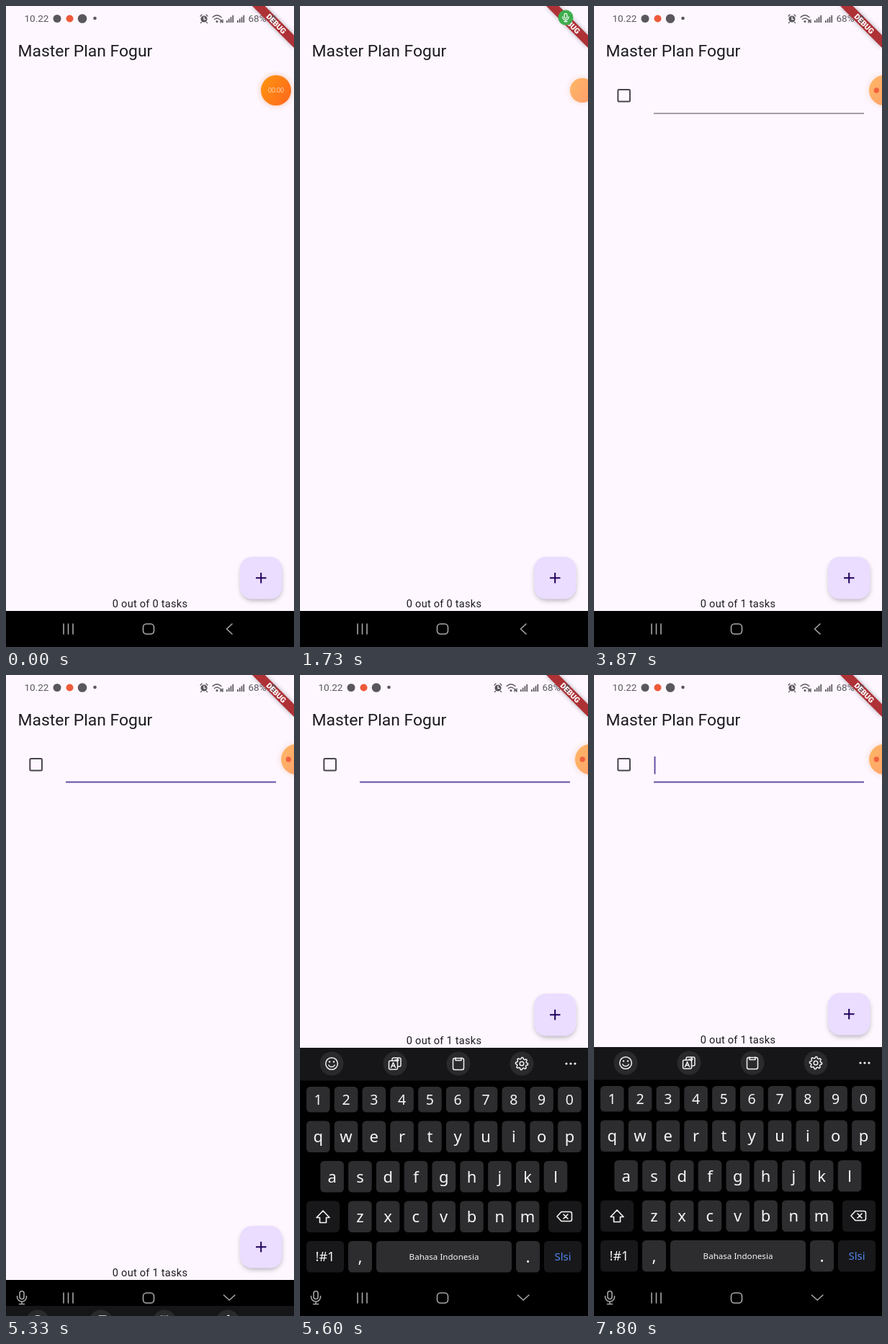
An HTML page for the animation above (8000 ms loop, 400 px wide and 889 px high).

```html
<!DOCTYPE html>
<html lang="en">
<head>
<meta charset="utf-8">
<title>Task list</title>
<style>
  html, body { margin: 0; width: 100%; height: 100%; overflow: hidden; background: #fef7ff; }
  svg { display: block; width: 100vw; height: 100vh; }
  text { font-family: Roboto, sans-serif; }
  .mid { text-anchor: middle; }
  .line { fill: none; stroke-linecap: round; stroke-linejoin: round; }
  .key { fill: #2d2d30; }
  .key.dark { fill: #18181a; }
  .cap { font-family: "Noto Sans", sans-serif; fill: #f6f6f6; text-anchor: middle; }
  #tools .line { stroke: #f2f2f2; stroke-width: 1.5; }
  #nav { stroke: #a6a6a6; stroke-width: 1.6; }
  #status { fill: #5a575c; }
  #status .line { stroke: #5a575c; stroke-width: 1.3; }
</style>
</head>
<body>
<svg viewBox="0 0 400 889" preserveAspectRatio="none">
  <defs>
    <linearGradient id="orange" x1="0" y1="0.2" x2="1" y2="0.8">
      <stop offset="0" stop-color="#ff9210"/><stop offset="1" stop-color="#ff6a1c"/>
    </linearGradient>
    <filter id="blur" x="-50%" y="-50%" width="200%" height="200%"><feGaussianBlur stdDeviation="3"/></filter>
    <g id="mic">
      <rect x="-3" y="-9" width="6" height="11" rx="3" class="line"/>
      <path d="M-6.5-2v1a6.5 6.5 0 0 0 13 0v-1M0 5.5V9M-3.5 9h7" class="line"/>
    </g>
  </defs>
  <rect width="400" height="889" fill="#fef7ff"/>

  <text x="16.600" y="70" font-size="22.880" fill="#1d1b20">Master Plan Fogur</text>

  <g id="task">
    <rect x="33.300" y="116" width="16.600" height="16.600" rx="1.500" fill="none" stroke="#49454f" stroke-width="2"/>
    <rect id="underline" x="83" width="292"/>
    <rect id="cursor" x="83.500" y="113" width="2" height="24.500" fill="#6750a4"/>
  </g>

  <g id="bottom">
    <rect x="326" y="768" width="57" height="57" rx="17" fill="#77727c" opacity=".5" filter="url(#blur)"/>
    <rect x="325" y="764" width="58.500" height="58.500" rx="16.600" fill="#eaddff"/>
    <path d="M347 793.300h14.500M354.200 786v14.500" stroke="#21005d" stroke-width="2"/>
    <text id="count" class="mid" x="200" y="834" font-size="14.560" letter-spacing=".26" fill="#1d1b20"></text>
  </g>

  <rect y="839" width="400" height="50" fill="#000"/>

  <g id="keyboard">
    <rect width="400" height="400" fill="#000"/>
    <rect width="400" height="45.500" fill="#161618"/>
    <g id="tools">
      <g id="discs" fill="#2a2a2d"></g>
      <g transform="translate(44 22)">
        <circle r="8.300" class="line"/><path d="M-4.200 2a4.700 4.700 0 0 0 8.400 0" class="line"/>
        <circle cx="-3" cy="-2.600" r="1.200" fill="#f2f2f2"/><circle cx="3" cy="-2.600" r="1.200" fill="#f2f2f2"/>
      </g>
      <g transform="translate(132 22)">
        <path d="M-4-4v-2q0-2 2-2h8q2 0 2 2v8q0 2-2 2h-2M0-5h5M3-7l2 2-2 2" class="line"/>
        <rect x="-8.500" y="-4" width="12" height="12" rx="2" class="line"/>
        <path d="M-5.500 5.500l3-7 3 7M-4.600 3.200h4.200" class="line"/>
      </g>
      <g transform="translate(220 22)">
        <rect x="-7.500" y="-7.500" width="15" height="16" rx="2.500" class="line"/>
        <path d="M-4-8v3.500h8V-8" class="line"/>
      </g>
      <g transform="translate(308 22)"><path id="gear" class="line"/><circle r="2.800" class="line"/></g>
      <g fill="#f2f2f2"><circle cx="370" cy="22" r="1.600"/><circle cx="376" cy="22" r="1.600"/><circle cx="382" cy="22" r="1.600"/></g>
    </g>
    <g id="keys"></g>
    <g stroke="#f6f6f6" stroke-width="1.600">
      <path d="M32 226l9 9.500h-4.500v7h-9v-7h-4.500z" class="line"/>
      <path d="M357 234l6-6.500h12q2.500 0 2.500 2.500v8q0 2.500-2.500 2.500h-12zM366 231l6 6M372 231l-6 6" class="line"/>
    </g>
  </g>

  <g id="nav">
    <path d="M80 857v14M86.500 857v14M93 857v14" class="line"/>
    <rect x="190.500" y="857" width="15" height="14" rx="4.500" class="line"/>
    <path id="back" d="M314 857l-7.500 7 7.500 7" class="line"/>
    <g id="typing">
      <path d="M302.500 860l7.700 7 7.700-7" class="line"/>
      <use href="#mic" x="22" y="863.500"/>
    </g>
  </g>

  <g id="status">
    <text x="25.500" y="22" font-size="13.500">10.22</text>
    <circle cx="71" cy="17.500" r="5.500"/>
    <circle cx="88.500" cy="17.500" r="5" fill="#ee5a3a"/>
    <circle cx="106" cy="17.500" r="6.300"/>
    <circle cx="123.500" cy="17" r="2.300"/>
    <circle cx="275" cy="18" r="4.600"/>
    <path d="M270 14l2-2M280 14l-2-2M271.500 22.500l-1 1M278.500 22.500l1 1" class="line"/>
    <path d="M275 15.500v3h2" class="line" style="stroke:#fef7ff"/>
    <path d="M287 15.500q6-5.500 12 0M289.500 18.500q3.500-3 7 0" class="line"/>
    <circle cx="293" cy="21.500" r="1.500"/><path d="M298 23v-4l1.500 1.500M301 19v4l-1.500-1.500" class="line"/>
    <g id="bars"></g>
    <text x="336.500" y="22" font-size="13.500">68%</text>
  </g>

  <path d="M342 0h17.600L400 40.400V58z" fill="#5c555e" opacity=".5" filter="url(#blur)"/>
  <path d="M342 0h17.600L400 40.400V58z" fill="#ae3136"/>
  <rect id="battery" x="366.500" y="13" width="8" height="10.500" rx="2" fill="#5a575c"/>
  <text class="mid" transform="translate(375.300 24.700) rotate(45)" y="3.700" font-size="10.600" font-weight="900" fill="#fff">DEBUG</text>

  <g id="badge">
    <circle r="10.500" fill="#3fae4e"/>
    <use href="#mic" transform="scale(.62)" stroke="#fff" stroke-width="2"/>
  </g>

  <g id="recorder">
    <circle id="glow" cy="117" fill="#f3c9b4" opacity=".7" filter="url(#blur)"/>
    <circle id="ball" cy="117" fill="url(#orange)"/>
    <text id="clock" class="mid" y="120" font-size="9" font-weight="300" fill="#fff"></text>
  </g>
  <circle id="dot" cx="392.300" cy="117" r="3.700" fill="#f0623f"/>
</svg>

<script>
const LOOP = 8000;
const $ = id => document.getElementById(id);
const set = (id, attrs) => { for (const k in attrs) $(id).setAttribute(k, attrs[k]); };
const show = (id, on) => { $(id).style.display = on ? "" : "none"; };
const mix = (a, b, p) => a + (b - a) * p;

// Value held since the latest entry of a [time, value] table.
const held = (table, t) => table.reduce((v, [at, next]) => t >= at ? next : v, table[0][1]);
// Progress 0..1 in n equal jumps, the first at a and the last at b.
const steps = (t, a, b, n) =>
  t < a ? 0 : Math.min(1, (Math.floor((t - a) / (b - a) * (n - 1) + 1e-6) + 1) / n);
const ease = p => 1 - (1 - p) ** 2;

const KEYBOARD_TOP = [[0, 889], [5330, 875], [5400, 690], [5470, 568], [5530, 531], [5600, 517], [5670, 516]];
const CURSOR = [[0, 0], [4870, 1], [5330, 0], [5800, 1], [6330, 0], [6800, 1], [7330, 0], [7800, 1]];

function buildKeyboard() {
  let out = "";
  const key = (x, y, w, h, label = "", size = 21, kind = "", fill = "") => {
    out += `<rect class="key ${kind}" x="${x}" y="${y}" width="${w}" height="${h}" rx="5.5"/>`;
    if (label) out += `<text class="cap" x="${x + w / 2}" y="${y + h / 2 + size * .36}" font-size="${size}" style="fill:${fill}">${label}</text>`;
  };
  const row = (chars, x, y, h, size) =>
    [...chars].forEach((c, i) => key(x + i * 38.8, y, 32.6, h, c, size));
  row("1234567890", 8.9, 54, 35.5, 19.5);
  row("qwertyuiop", 8.9, 101.5, 43.5, 22);
  row("asdfghjkl", 28.3, 157, 43.5, 22);
  row("zxcvbnm", 67, 212.5, 43.5, 22);
  key(9, 212.5, 46, 43.5, "", 0, "dark");
  key(345, 212.5, 46, 43.5, "", 0, "dark");
  key(9, 268, 52, 43.5, "!#1", 18, "dark");
  key(67, 268, 33, 43.5, ",", 23);
  key(106, 268, 188, 43.5, "Bahasa Indonesia", 11.6);
  key(300, 268, 33, 43.5, ".", 23);
  key(339, 268, 52, 43.5, "Slsi", 15, "dark", "#4f86e8");
  $("keys").innerHTML = out;
  $("discs").innerHTML = [44, 132, 220, 308].map(x => `<circle cx="${x}" cy="22" r="16.5"/>`).join("");

  const points = Array.from({ length: 32 }, (_, i) => {
    const r = i % 4 < 2 ? 8.6 : 6.6, a = i * Math.PI / 16;
    return `${(r * Math.cos(a)).toFixed(1)} ${(r * Math.sin(a)).toFixed(1)}`;
  });
  set("gear", { d: `M${points.join("L")}Z` });
}

function buildSignal() {
  $("bars").innerHTML = [306, 321].map(x => [0, 1, 2, 3].map(i =>
    `<rect x="${x + i * 2.8}" y="${20 - i * 2.4}" width="1.7" height="${3 + i * 2.4}"/>`).join("")).join("");
}

function drawStatus(t) {
  const leave = steps(t, 70, 270, 4), back = steps(t, 1930, 2200, 5);
  const visible = 1 - leave + back;
  set("status", { opacity: visible });
  set("battery", { opacity: visible * .7 });
  const shrink = ease(back);
  const scale = leave * mix(1, .25, shrink);
  set("badge", { transform: `translate(${mix(369, 381, shrink)} ${mix(16, 22, shrink)}) scale(${scale})` });
  show("badge", t >= 70 && t < 2800);
}

function drawRecorder(t) {
  const slide = ease(steps(t, 1135, 1730, 9)), dock = steps(t, 2330, 2400, 2);
  const cx = mix(mix(375, 392, slide), 403, dock);
  const r = mix(mix(21, 17, slide), 21, dock);
  set("ball", { cx, r });
  set("glow", { cx, r: r + 2 });
  set("recorder", { opacity: t < 1070 ? 1 : .64 });
  set("clock", { x: cx, opacity: t < 1070 ? 1 : .6 * (1 - slide) });
  $("clock").textContent = t < 600 ? "00:00" : "00:01";
  show("dot", t >= 2400);
}

function drawTask(t) {
  const focus = steps(t, 4870, 5070, 4), h = mix(1, 2, focus);
  show("task", t >= 3730);
  set("underline", { y: 149.5 - h, height: h, fill: focus ? "#6750a4" : "#49454f" });
  show("cursor", held(CURSOR, t));
  $("count").textContent = `0 out of ${t < 3730 ? 0 : 1} tasks`;
}

function drawKeyboard(t) {
  const top = held(KEYBOARD_TOP, t), typing = t >= 5270;
  set("keyboard", { transform: `translate(0 ${top})` });
  set("bottom", { transform: `translate(0 ${Math.min(0, top - 839)})` });
  show("typing", typing);
  show("back", !typing);
}

function frame(now) {
  const t = now % LOOP;
  drawStatus(t);
  drawRecorder(t);
  drawTask(t);
  drawKeyboard(t);
}

buildKeyboard();
buildSignal();
const start = performance.now();
function tick() {
  frame(performance.now() - start);
  requestAnimationFrame(tick);
}
tick();
</script>
</body>
</html>
```
